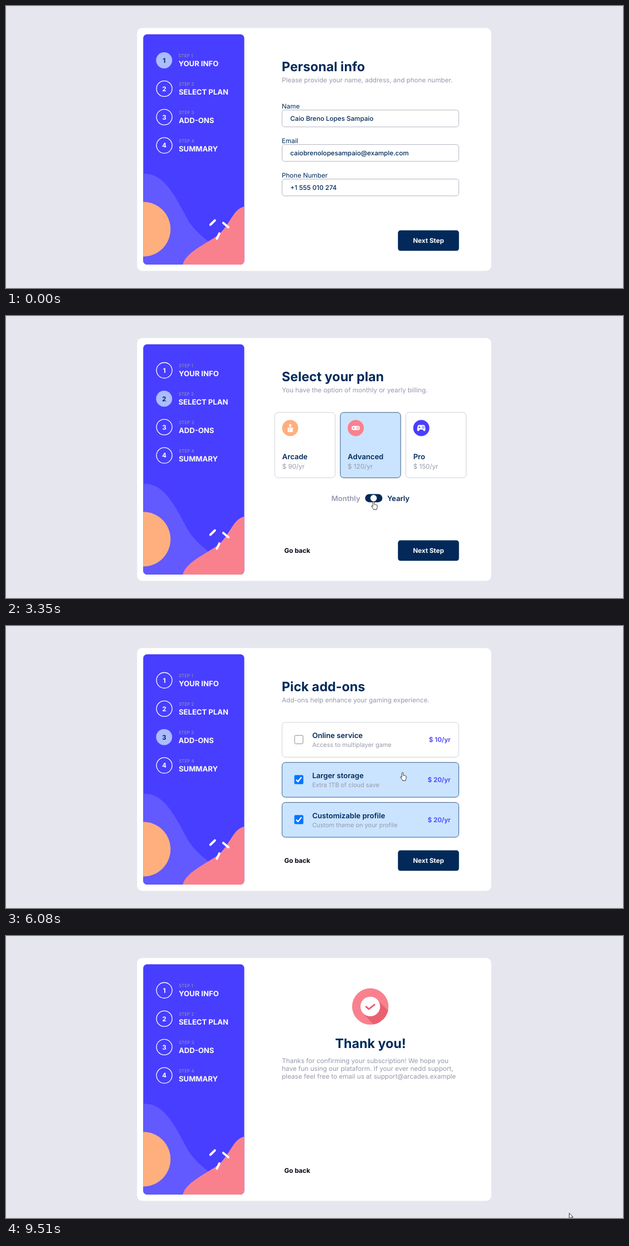
Write an HTML page that moves like this. It is 1107 px wide and 506 px high and loops after 9550 ms.

```html
<!DOCTYPE html>
<html lang="en">
<head>
<meta charset="utf-8">
<title>Multi-step form</title>
<style>
  html, body { margin: 0; width: 100%; height: 100%; overflow: hidden; background: #e6e6ef; }
  svg { display: block; width: 100vw; height: 100vh; }
  text {
    font: 400 11.64px Inter, "Liberation Sans", sans-serif;
    font-variation-settings: "opsz" 16;
    text-rendering: geometricPrecision;
    white-space: pre;
    fill: #022959;
  }
  .title { font-size: 23.27px; font-weight: 700; font-variation-settings: "opsz" 32; }
  .head { font-size: 13.09px; font-weight: 600; font-variation-settings: "opsz" 18; }
  .nav { font-size: 13.09px; font-weight: 700; font-variation-settings: "opsz" 18; fill: #fff; }
  .step { font-size: 8px; font-variation-settings: "opsz" 14; fill: #9699ab; }
  .grey { fill: #9699ab; }
  .small { font-size: 10.9px; fill: #9699ab; font-variation-settings: "opsz" 15; }
  .value { font-weight: 500; }
  .bold { font-weight: 700; }
  .white { fill: #fff; }
  .black { fill: #06000f; }
  .price { font-weight: 600; fill: #483eff; }
  .off { fill: #9699ab; }
  .mid { text-anchor: middle; }
  .end { text-anchor: end; }
</style>
</head>
<body>
<svg viewBox="0 0 1107 506" preserveAspectRatio="none">
  <clipPath id="side"><rect x="246.2" y="50.8" width="181.3" height="413.2" rx="7"/></clipPath>
  <clipPath id="badge"><circle cx="653.6" cy="126.5" r="32.7"/></clipPath>
  <rect width="1107" height="506" fill="#e6e6ef"/>
  <rect x="235.2" y="39.6" width="635.3" height="435.6" rx="9" fill="#fff"/>
  <g clip-path="url(#side)">
    <rect x="246" y="50" width="182" height="415" fill="#483eff"/>
    <path fill="#6259ff" d="M221 446C248 511 368 549 400 496.500C431.500 444 352 434 324 379.600C296 325 274 291 233.500 303.500C193 316 193 381 221 446Z"/>
    <circle cx="246.200" cy="400.500" r="49" fill="#ffaf7e"/>
    <path fill="#f9818e" d="M428 359.800C408 364 404 388 384 408C366 424 322 440 317 465H428Z"/>
    <path stroke="#fff" stroke-width="4" stroke-linecap="round" d="M366.700 392.500L374.700 384.700M389.800 389.200L399 397M378.300 417.500L382.800 408"/>
  </g>
  <g id="view"></g>
  <g id="knob"><circle cy="326.900" r="5.800" fill="#fff"/></g>
  <g id="cursor" stroke="#222" stroke-width=".9" stroke-linejoin="round" fill="#fff">
    <path id="hand" d="M-1.300 8.600V1.200a1.300 1.300 0 0 1 2.600 0V5.200q1-.8 1.900.2q1-.5 1.800.4q1.400-.3 1.500 1.100V10q0 2-1.100 3V14.400H-.2V13.200Q-2.300 11-3.500 8.700Q-3.800 7.200-2.500 7.300Z"/>
    <path id="arrow" d="M0 0V10.200L2.400 8L4 11.600L5.600 10.900L4.100 7.400H7Z"/>
  </g>
</svg>
<script>
const LOOP = 9550;
const $ = id => document.getElementById(id);

// [time, x, y] of the pointer tip
const PATH = [
  [0, 700, 514], [70, 700, 508], [430, 748, 428], [560, 750, 420], [760, 750, 422],
  [1000, 752, 456], [1120, 752, 455], [1560, 745, 262], [1750, 743, 245], [1880, 743, 243],
  [1990, 690, 240], [2280, 545, 236], [2380, 541, 236], [2640, 640, 246], [2900, 659.5, 333],
  [3600, 659.5, 333], [4000, 670, 333], [4070, 671, 333], [4400, 740, 412], [4490, 741.5, 415],
  [5060, 741, 418], [5380, 726, 371], [5560, 726, 370], [5860, 711.500, 265], [6080, 711.500, 263],
  [6300, 709, 213], [6450, 709, 212], [6850, 745, 419], [6980, 746, 420], [7200, 727, 367],
  [7300, 727, 366], [7550, 750.500, 418], [8000, 750.500, 418], [8500, 724, 420], [8780, 722, 420],
  [8930, 722, 420], [9500, 1010.500, 497], [9550, 1010.500, 497]
];

// [time, value] switches
const PAGE = [[0, 0], [720, 1], [4640, 2], [8030, 3], [8950, 4]];
const PLAN = [[0, -1], [1500, 2], [1970, 1], [2270, 0], [2560, 1]];
const ADDONS = [[0, ""], [5470, "2"], [5920, "12"], [6380, "012"], [7260, "01"]];
const TOGGLE = 3130, SLIDE = 440;

const plans = [["Arcade", 9, "#ffaf7e"], ["Advanced", 12, "#f9818e"], ["Pro", 15, "#483eff"]];
const addons = [
  ["Online service", "Access to multiplayer game", 10],
  ["Larger storage", "Extra 1TB of cloud save", 20],
  ["Customizable profile", "Custom theme on your profile", 20]
];
const fields = [
  ["Name", "Caio Breno Lopes Sampaio"],
  ["Email", "caiobrenolopesampaio@example.com"],
  ["Phone Number", "+1 555 010 274"]
];
const steps = ["YOUR INFO", "SELECT PLAN", "ADD-ONS", "SUMMARY"];

const at = (table, t) => table.reduce((v, [time, next]) => t >= time ? next : v, table[0][1]);
const smooth = k => k * k * (3 - 2 * k);
const text = (x, y, s, cls = "") => `<text x="${x}" y="${y}" class="${cls}">${s}</text>`;
const box = (x, y, w, h, r, fill, stroke = "none") =>
  `<rect x="${x}" y="${y}" width="${w}" height="${h}" rx="${r}" fill="${fill}" stroke="${stroke}"/>`;
const choice = (x, y, w, h, on) =>
  box(x, y, w, h, 6, on ? "#cae4ff" : "#fff", on ? "#365d86" : "#cfd1da");
const heading = (title, sub) => text(494.800, 117, title, "title") + text(495, 137, sub, "grey");

function nav(page) {
  return steps.map((name, i) => {
    const y = 97.500 + i * 50.900, on = i === page, x = on ? 309.500 : 310;
    const ring = on
      ? `<circle cx="283.700" cy="${y}" r="14.400" fill="#abbcff"/>`
      : `<circle cx="284" cy="${y}" r="14" fill="none" stroke="#fff" stroke-width="1.300"/>`;
    return ring + text(on ? 283.700 : 284, y + 4.200, i + 1, "bold mid" + (on ? "" : " white")) +
      text(x, y - 5.700, "STEP " + (i + 1), "step") + text(x, y + 10.700, name, "nav");
  }).join("");
}

function icon(i, x) {
  const art = [
    `<circle cy="-4.800" r="2.200" fill="#fff"/><path stroke="#fff" stroke-width="1.500" d="M0-4V0"/>
     <rect x="-4.700" y="-1" width="9.400" height="8.300" rx="1" fill="#fff"/>
     <path stroke="#ffaf7e" d="M0-1V2M-2 5L0 2.600"/>`,
    `<rect x="-7.500" y="-3.700" width="15" height="7.400" rx="3.700" fill="#fff"/>
     <path stroke="#f9818e" stroke-width="1.100" d="M-5.500 0h3.400M-3.800-1.700v3.400"/>
     <circle cx="3.800" r="1.900" fill="none" stroke="#f9818e"/>`,
    `<path fill="#fff" d="M-4.800-5.500H4.800Q7-5 7.500 2.500Q7.400 5.800 5 5.600Q3.800 5 2.500 2.800H-2.500Q-3.800 5-5 5.600Q-7.400 5.800-7.500 2.500Q-7-5-4.800-5.500Z"/>
     <path stroke="#483eff" stroke-width="1.100" d="M-5.200-1.300h3.600M-3.400-3.100v3.600"/>
     <circle cx="3.400" cy="-1.300" r="1.700" fill="none" stroke="#483eff"/>`
  ];
  return `<g transform="translate(${x} 201)"><circle r="14.500" fill="${plans[i][2]}"/>${art[i]}</g>`;
}

const rate = (n, yearly) => yearly ? `$ ${n * 10}/yr` : `$ ${n}/mo`;

const pages = [
  () => heading("Personal info", "Please provide your name, address, and phone number.") +
    fields.map(([label, value], i) => {
      const y = 186.700 + i * 61.900;
      return text(494.800, y - 2.700, label) + box(495.300, y, 317, 30.200, 4.500, "#fff", "#b3b5c3") +
        text(510, y + 19.500, value, "value");
    }).join(""),

  s => heading("Select your plan", "You have the option of monthly or yearly billing.") +
    plans.map(([name, cost], i) => {
      const x = 482.200 + i * 117.600;
      return choice(x, 173, 108.300, 117.300, s.plan === i) + icon(i, x + 27.700) +
        text(x + 13.300, 257, name, "head") + text(x + 13.300, 274.300, rate(cost, s.yearly), "grey");
    }).join("") +
    text(583.700, 332, "Monthly", "head" + (s.yearly ? " off" : "")) +
    text(684, 332, "Yearly", "head" + (s.yearly ? "" : " off")) +
    box(644.300, 319.500, 31, 14.700, 7.350, "#022959"),

  s => heading("Pick add-ons", "Add-ons help enhance your gaming experience.") +
    addons.map(([name, info, cost], i) => {
      const y = 173 + i * 71.800, on = s.picked.includes(i);
      const check = on
        ? box(517.300, y + 22.700, 16.200, 16.200, 2, "#0075ff") +
          `<path d="M520.500 ${y + 31}l3.300 3.500l6.300-8" fill="none" stroke="#fff" stroke-width="2.200"/>`
        : box(517.900, y + 23.300, 15, 15, 1.800, "#fff", "#8a8a8a");
      return choice(495.300, y, 317, 62.400, on) + check + text(549.400, y + 28, name, "head") +
        text(549.400, y + 44.300, info, "small") + text(797.700, y + 35.200, `$ ${cost}/yr`, "price end");
    }).join(""),

  s => {
    const extra = [...s.picked].map(i => addons[i]);
    const total = extra.reduce((sum, a) => sum + a[2], plans[s.plan][1] * 10);
    return heading("Finishing up", "Double-check everything looks OK before confirming.") +
      box(495, 172.700, 317.800, 121, 6, "#f8f9ff") +
      text(510, 197, plans[s.plan][0] + " (Yearly)", "bold") + text(510, 213, "Change", "small") +
      text(797.700, 205, rate(plans[s.plan][1], true), "bold end") +
      box(510, 226, 288, .8, 0, "#d6d9e6") +
      extra.map(([name, , cost], i) => text(510, 250 + i * 26, name, "small") +
        text(797.700, 250 + i * 26, `+$ ${cost}/yr`, "end")).join("") +
      text(510, 323, "Total (per year)", "small") + text(797.700, 323, `$ ${total}/yr`, "price end");
  },

  () => `<g clip-path="url(#badge)"><circle cx="653.600" cy="126.500" r="33" fill="#f9818e"/>
    <path fill="#e96170" d="M666 114.500L690 138V165H665L641 139Z"/></g>
    <circle cx="653.600" cy="126.500" r="17.600" fill="#fff"/>
    <path d="M645.300 126.200l5.600 5l11.200-8.800" fill="none" stroke="#e96170" stroke-width="2.900"/>` +
    text(654, 200.700, "Thank you!", "title mid") +
    ["Thanks for confirming your subscription! We hope you",
     "have fun using our plataform. If your ever nedd support,",
     "please feel free to email us at support@arcades.example"]
      .map((line, i) => text(495, 228 + i * 14.050, line, "grey")).join("")
];

function buttons(page, hover) {
  const last = page === 3;
  const fill = last ? (hover ? "#928cff" : "#483eff") : (hover ? "#1d3f69" : "#022959");
  return (page > 0 ? text(499.300, 425, "Go back", "bold black") : "") +
    (page < 4 ? box(703.200, 402.600, 109.500, 36.600, 4.500, fill) +
      text(758, 425, last ? "Confirm" : "Next Step", "bold white mid") : "");
}

function pointer(t) {
  const i = Math.max(1, PATH.findIndex(p => p[0] > t));
  const [t0, x0, y0] = PATH[i - 1], [t1, x1, y1] = PATH[i];
  const k = smooth((t - t0) / (t1 - t0));
  return [x0 + (x1 - x0) * k, y0 + (y1 - y0) * k];
}

const inside = (x, y, left, top, w, h) => x >= left && x <= left + w && y >= top && y <= top + h;

function clickable(page, x, y) {
  if (page === 0) return [0, 1, 2].some(i => inside(x, y, 495, 187 + i * 62, 318, 30));
  if (page === 1) return inside(x, y, 644, 319, 31, 15) ||
    [0, 1, 2].some(i => inside(x, y, 482 + i * 117.600, 173, 108, 117));
  if (page === 2) return [0, 1, 2].some(i => inside(x, y, 495, 173 + i * 71.800, 318, 62));
  return false;
}

let shown = "";
function draw(t) {
  const [x, y] = pointer(t);
  const s = { page: at(PAGE, t), plan: at(PLAN, t), picked: [...at(ADDONS, t)].map(Number), yearly: t >= TOGGLE };
  s.hover = s.page < 4 && inside(x, y, 703, 403, 110, 36);
  const key = JSON.stringify(s);
  if (key !== shown) {
    $("view").innerHTML = nav(s.page) + pages[s.page](s) + buttons(s.page, s.hover);
    shown = key;
  }
  const slide = smooth(Math.min(1, Math.max(0, (t - TOGGLE) / SLIDE)));
  $("knob").setAttribute("transform", `translate(${652 + 14.900 * slide} 0)`);
  $("knob").style.display = s.page === 1 ? "" : "none";
  const hand = s.hover || clickable(s.page, x, y);
  $("hand").style.display = hand ? "" : "none";
  $("arrow").style.display = hand ? "none" : "";
  $("cursor").setAttribute("transform", `translate(${x} ${y})`);
}

function tick() {
  draw(performance.now() % LOOP);
  requestAnimationFrame(tick);
}
tick();
</script>
</body>
</html>
```
